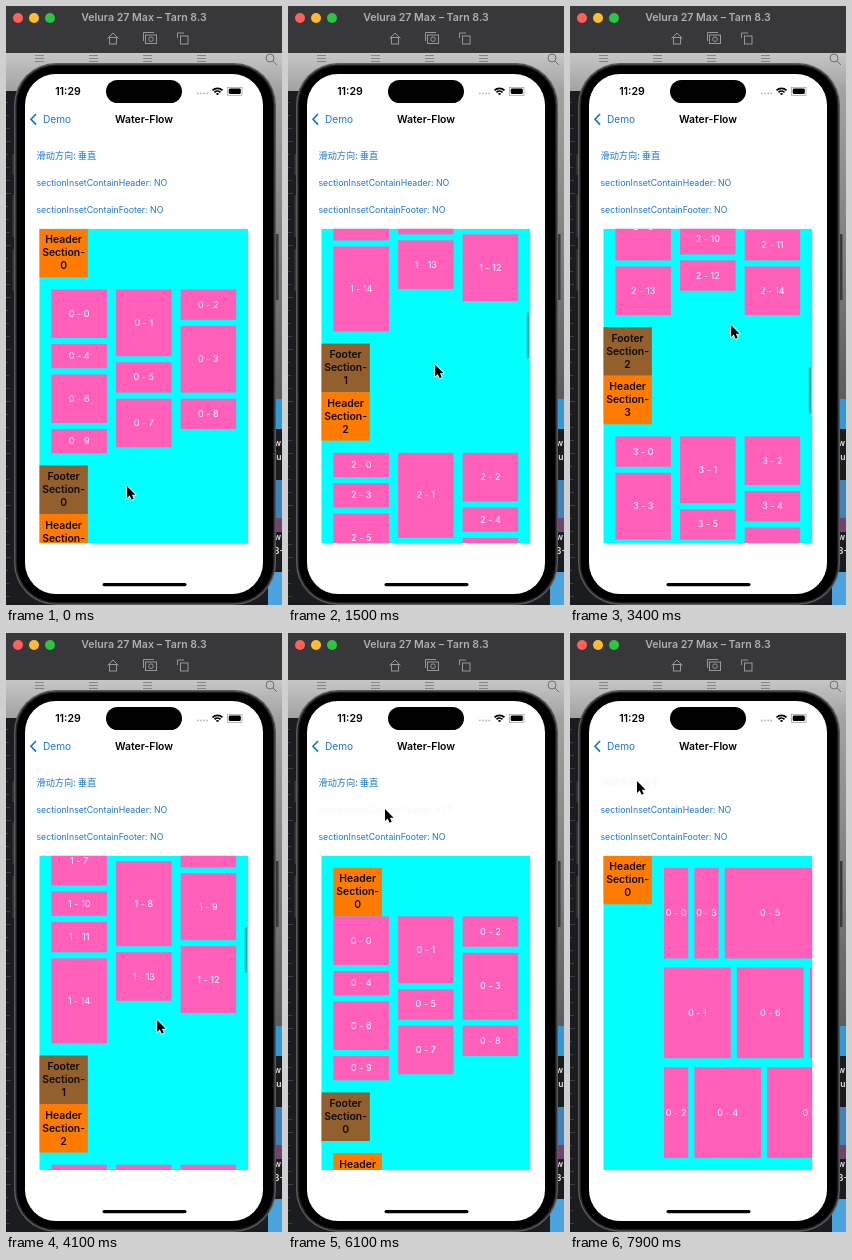
An HTML page with a canvas for the animation above (8000 ms loop, 276 by 599 pixels).

```html
<!DOCTYPE html>
<html lang="en">
<head>
<meta charset="utf-8">
<title>Water-Flow</title>
<style>
html, body { margin: 0; width: 100%; height: 100%; overflow: hidden; background: #1b1c1f; }
canvas { display: block; width: 276px; height: 599px; }
</style>
</head>
<body>
<canvas id="stage"></canvas>
<script>
const W = 276, H = 599, LOOP = 8000;
const PT = 0.607;                       // pixels per layout point
const INSET = 20 * PT, GUTTER = 15 * PT, CAP = 80 * PT, GAP = 10;
const VIEW = { x: 33.3, y: 222.7, w: 209, h: 314.3 };
const SANS = 'Inter, "Noto Sans", sans-serif';
const CJK = '"Noto Sans CJK SC", "Noto Sans CJK", sans-serif';
const BLUE = '#1a78d2', METAL = '#39393b';

// Item lengths in points, one list per section
const SECTIONS = [
  [80, 110, 50, 110, 40, 50, 80, 80, 50, 40],
  [110, 80, 50, 40, 110, 110, 40, 80, 140, 110, 40, 50, 110, 80, 140],
  [40, 140, 80, 40, 40, 80, 40, 80, 110, 50, 50, 50, 50, 80, 80],
  [50, 110, 80, 110, 50, 50, 80]
];
const SIDEWAYS = [40, 110, 40, 40, 110, 150, 110, 150, 80];

// Where the list and the pointer come to rest
const POSES = [
  { t: 0, scroll: 0, x: 121, y: 480 },
  { t: 1450, scroll: 554, x: 147, y: 357 },
  { t: 2280, scroll: 448, x: 153, y: 492 },
  { t: 3380, scroll: 928, x: 161, y: 319 },
  { t: 4680, scroll: 137, x: 144, y: 436 },
  { t: 5800, scroll: 0, x: 97, y: 176 },
  { t: 7000, scroll: 0, x: 97, y: 176 },
  { t: 7650, scroll: 0, x: 67, y: 148 }
];
const TAP_ON = 6000, TAP_OFF = 6900, TAP_TURN = 7750;

const canvas = document.getElementById('stage');
const c = canvas.getContext('2d');
const dpr = window.devicePixelRatio || 1;
canvas.width = W * dpr;
canvas.height = H * dpr;

const clamp = v => Math.max(0, Math.min(1, v));

function pose(t) {
  const n = POSES.findIndex(p => p.t > t);
  if (n < 0) return POSES[POSES.length - 1];
  const a = POSES[n - 1], b = POSES[n];
  const u = (t - a.t) / (b.t - a.t), ease = u * u * (3 - 2 * u);
  const mix = key => a[key] + (b[key] - a[key]) * ease;
  return { scroll: mix('scroll'), x: mix('x'), y: mix('y') };
}

// Each item goes to the shortest lane
function flow(lengths) {
  const ends = [0, 0, 0];
  const items = lengths.map(len => {
    const lane = ends.indexOf(Math.min(...ends));
    const start = ends[lane];
    ends[lane] += len + GAP;
    return { lane, start, len };
  });
  return { items, size: Math.max(...ends) - GAP };
}
const columns = SECTIONS.map(flow);
const rows = flow(SIDEWAYS);
const lanePitch = extent => (extent - 2 * INSET + GUTTER) / 3;

function rect(x, y, w, h, color) {
  c.fillStyle = color;
  c.fillRect(x, y, w, h);
}
function round(x, y, w, h, r, color) {
  c.fillStyle = color;
  c.beginPath();
  c.roundRect(x, y, w, h, r);
  c.fill();
}
function line(color, width, ...points) {
  c.strokeStyle = color;
  c.lineWidth = width;
  c.beginPath();
  points.forEach(p => c.lineTo(...p));
  c.stroke();
}
function ring(x, y, r, from = 0, to = 7) {
  c.beginPath();
  c.arc(x, y, r, from, to);
  c.stroke();
}
function fadeDown(y, h, from, to) {
  const g = c.createLinearGradient(0, y, 0, y + h);
  g.addColorStop(0, from);
  g.addColorStop(1, to);
  return g;
}
function text(str, x, y, size, color, weight = 400, align = 'left', family = SANS) {
  c.font = `${weight} ${size}px ${family}`;
  c.textAlign = align;
  c.textBaseline = 'middle';
  c.fillStyle = color;
  c.fillText(str, x, y);
}

function drawDesktop() {
  rect(0, 0, W, H, '#1b1c1f');
  rect(0, 47, W, 38, fadeDown(47, 38, '#c6c6c6', '#a2a2a2'));
  rect(262, 85, 14, 308, fadeDown(85, 308, '#a2a2a2', '#5c5c5e'));
  // toolbar behind the phone
  for (let x = 29; x < 220; x += 54) {
    for (let i = 0; i < 3; i++) rect(x, 49 + i * 3, 9, 1, '#858586');
  }
  line('#6f6f70', 1, [267, 55], [271, 59]);
  ring(264, 52, 4);
  // code and folders peeking out on both sides
  for (let y = 96; y < H; y += 13) rect(0, y, 2 + y % 4, 1, '#3a3f47');
  rect(262, 393, 14, 30, '#3199d4');
  rect(262, 474, 14, 38, '#3f83b9');
  rect(262, 512, 14, 14, '#70446f');
  rect(262, 566, 14, 33, '#4aa3dc');
  for (const y of [437, 531]) {
    text('w', 268, y, 8.5, '#e8e8e8', 600);
    text(y < 500 ? 'lu' : '3-', 268, y + 14.5, 8.5, '#e8e8e8', 600);
  }
}

function drawTitleBar() {
  const ink = '#99979b';
  rect(0, 0, W, 47, '#38373a');
  ['#ff5f57', '#febc2e', '#28c840'].forEach((color, i) => round(7 + i * 16, 7, 10, 10, 5, color));
  text('Velura 27 Max – Tarn 8.3', 138, 12, 10.6, '#b0aeb2', 600, 'center');
  line(ink, 1, [101.5, 32.5], [107, 27], [112.5, 32.5]);
  c.strokeRect(103.5, 31.5, 7, 6.5);
  c.strokeRect(139.5, 29, 11, 8.5);
  ring(145, 33.2, 2.3);
  line(ink, 1, [137.5, 35], [137.5, 26.5], [148, 26.5]);
  c.strokeRect(174.5, 30, 7.5, 8);
  line(ink, 1, [171.5, 32], [171.5, 27], [178, 27]);
}

function drawStatus() {
  text('11:29', 62, 85.5, 10.6, '#000', 600, 'center');
  for (let i = 0; i < 4; i++) round(191 + i * 3.1, 86.5, 1.8, 1.8, 1, '#b4b4b4');
  c.strokeStyle = '#000';
  c.lineWidth = 1.7;
  for (let r = 1.5; r < 8; r += 2.8) ring(211.5, 89.5, r, -2.35, -0.79);
  c.strokeStyle = '#999';
  c.lineWidth = 0.7;
  c.strokeRect(221.5, 81.3, 14.5, 8);
  round(222.7, 82.5, 12.1, 5.6, 1.4, '#000');
}

function drawPhone() {
  rect(6.5, 148, 3, 21, METAL);
  for (const y of [189, 243]) rect(6.5, y, 3, 42, METAL);
  rect(268.5, 228, 4, 66, METAL);
  ['#5b5a5e', '#242426', '#000'].forEach((color, i) => {
    const d = i * 1.4;
    round(8 + d, 57 + d, 262 - 2 * d, 542 - 2 * d, 42 - d, color);
  });
  round(19, 68, 238, 520, 31, '#fff');
  round(100, 74, 76, 23, 11.5, '#000');
  drawStatus();
  line('#0a72d8', 1.6, [30, 108], [25, 113.3], [30, 118.6]);
  text('Demo', 37, 113.5, 10.1, BLUE);
  text('Water-Flow', 138, 113.5, 10.4, '#000', 600, 'center');
  round(96.5, 577, 84, 3.2, 1.6, '#000');
}

function drawButtons(t, inset, sideways) {
  const button = (label, y, size, family, ...taps) => {
    const tap = taps.find(p => t >= p && t < p + 500);
    c.globalAlpha = tap === undefined ? 1 : Math.max(0.06, (t - tap - 200) / 300);
    text(label, 30.5, y, size, BLUE, 400, 'left', family);
    c.globalAlpha = 1;
  };
  button('滑动方向: ' + (sideways ? '水平' : '垂直'), 149.5, 9.2, CJK, TAP_TURN);
  button('sectionInsetContainHeader: ' + (inset ? 'YES' : 'NO'), 177, 8.75, SANS, TAP_ON, TAP_OFF);
  button('sectionInsetContainFooter: NO', 204.5, 8.75, SANS);
}

function drawItem(label, x, y, w, h) {
  rect(x, y, w, h, '#ff5fb8');
  text(label, x + w / 2, y + h / 2 + 0.3, 9.1, '#fff', 400, 'center');
}
function drawCap(kind, section, x, y) {
  rect(x, y, CAP, CAP, kind === 'Header' ? '#ff7a00' : '#925f2d');
  [kind, 'Section-', section].forEach((s, i) =>
    text(s, x + CAP / 2, y + 11.5 + i * 13, 10.4, '#100a04', 600, 'center'));
}

function drawColumns(scroll, inset) {
  const pitch = lanePitch(VIEW.w), shift = inset ? INSET : 0;
  let top = VIEW.y - scroll;
  columns.forEach(({ items, size }, s) => {
    drawCap('Header', s, VIEW.x + shift, top + shift);
    items.forEach(({ lane, start, len }, i) => drawItem(`${s} - ${i}`,
      VIEW.x + INSET + lane * pitch, top + CAP + INSET + start * PT, pitch - GUTTER, len * PT));
    top += CAP + 2 * INSET + size * PT;
    drawCap('Footer', s, VIEW.x, top);
    top += CAP;
  });
}
function drawRows() {
  const pitch = lanePitch(VIEW.h);
  drawCap('Header', 0, VIEW.x, VIEW.y);
  rows.items.forEach(({ lane, start, len }, i) => drawItem(`0 - ${i}`,
    VIEW.x + CAP + INSET + start * PT, VIEW.y + INSET + lane * pitch, len * PT, pitch - GUTTER));
}

function drawList(t, scroll, inset, sideways) {
  c.save();
  c.beginPath();
  c.rect(VIEW.x, VIEW.y, VIEW.w, VIEW.h);
  c.clip();
  rect(VIEW.x, VIEW.y, VIEW.w, VIEW.h, '#00ffff');
  if (sideways) {
    drawRows();
  } else {
    drawColumns(scroll, inset);
    c.globalAlpha = Math.min(clamp(t / 100), clamp((5900 - t) / 300));
    round(238.8, 225 + scroll * 0.147, 2, 46, 1, 'rgba(0, 90, 90, .6)');
  }
  c.restore();
}

function drawPointer(x, y) {
  c.save();
  c.translate(x, y);
  c.lineJoin = 'round';
  c.beginPath();
  [[0, 0], [0, 12], [2.7, 9.5], [4.6, 13.7], [6.7, 12.8], [4.9, 8.7], [8.6, 8.7]].forEach(p => c.lineTo(...p));
  c.closePath();
  c.strokeStyle = '#fff';
  c.lineWidth = 1.6;
  c.stroke();
  c.fillStyle = '#000';
  c.fill();
  c.restore();
}

function frame(now) {
  const t = now % LOOP;
  const inset = t >= TAP_ON && t < TAP_OFF;
  const sideways = t >= TAP_TURN;
  const { scroll, x, y } = pose(t);
  c.setTransform(dpr, 0, 0, dpr, 0, 0);
  drawDesktop();
  drawTitleBar();
  drawPhone();
  drawButtons(t, inset, sideways);
  drawList(t, scroll, inset, sideways);
  drawPointer(x, y);
  requestAnimationFrame(frame);
}
requestAnimationFrame(frame);
</script>
</body>
</html>
```
